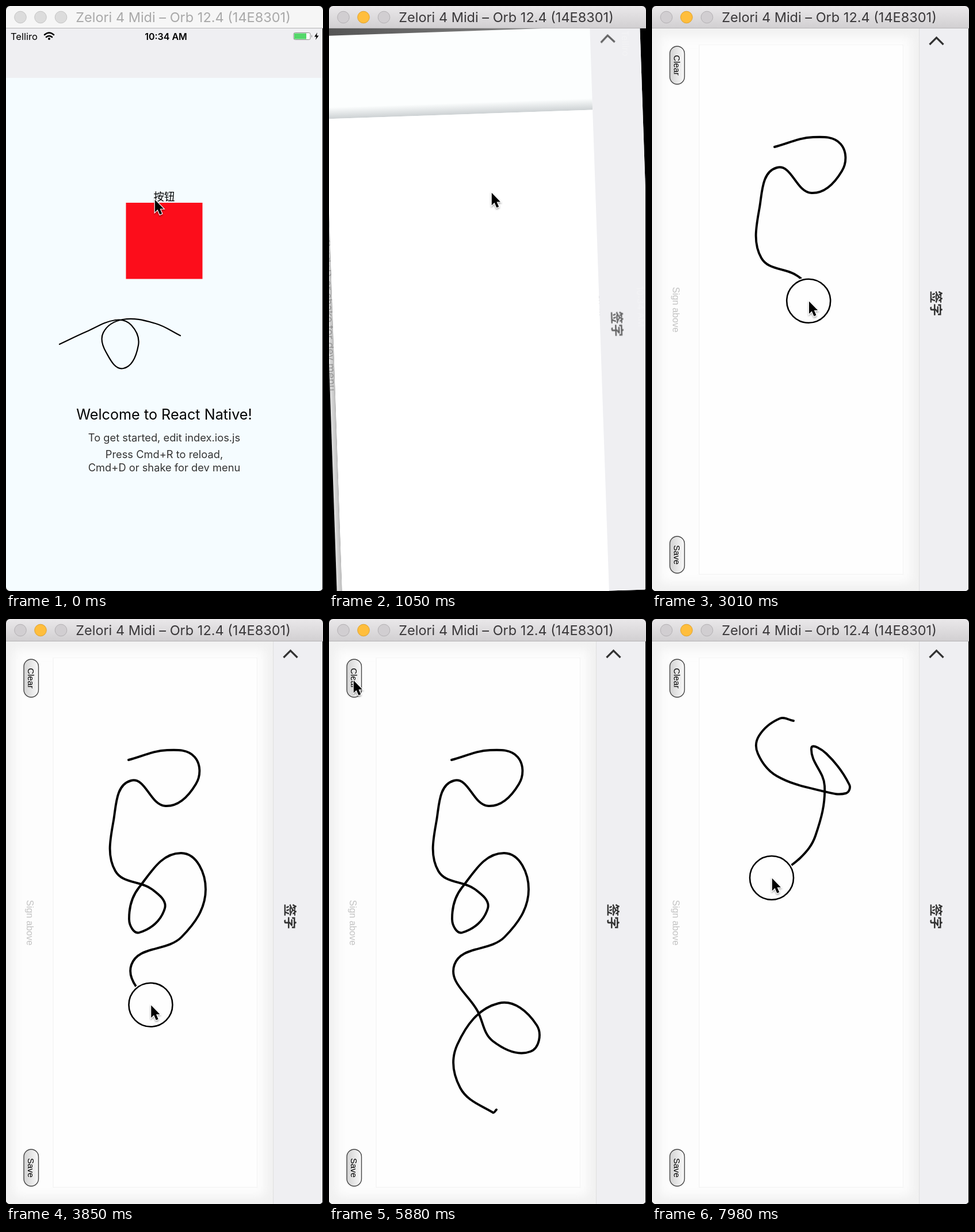
Animation of 551x1017 px, one loop 8000 ms. Source, as an HTML page:

```html
<!DOCTYPE html>
<html lang="en">
<head>
<meta charset="utf-8">
<title>Sign pad</title>
<style>
html, body { margin: 0; width: 100%; height: 100%; overflow: hidden; background: #000; }
svg { display: block; font-family: Inter, "Noto Sans CJK SC", "Noto Sans CJK", sans-serif; }
.mid { text-anchor: middle; }
.web { font-family: "Liberation Sans", Arial, sans-serif; text-anchor: middle; }
.line { fill: none; stroke: #000; stroke-linecap: round; stroke-linejoin: round; }
.bar { fill: #f6f6f6; }
.title { fill: #a9a9a9; font-size: 23.5px; }
.light { fill: #dcdcdc; stroke: #c4c4c4; }
.on .bar { fill: url(#barFill); }
.on .title { fill: #3a383a; }
.on .light { fill: #d1ced1; stroke: #b3b0b3; }
.on .light.min { fill: #ffbe3d; stroke: #dfa12c; }
</style>
</head>
<body>
<svg id="stage" width="551" height="1017" viewBox="0 0 551 1017">
  <defs>
    <linearGradient id="barFill" x2="0" y2="1"><stop stop-color="#eae8ea"/><stop offset="1" stop-color="#d1cfd1"/></linearGradient>
    <linearGradient id="shade" x2="0" y2="1"><stop stop-color="#8a9297" stop-opacity="0"/><stop offset="1" stop-color="#8a9297" stop-opacity=".42"/></linearGradient>
    <linearGradient id="edge"><stop stop-color="#e2e2e2"/><stop offset="1" stop-color="#bdbdbd"/></linearGradient>
    <linearGradient id="btn"><stop stop-color="#d2d2d2"/><stop offset="1" stop-color="#fafafa"/></linearGradient>
    <linearGradient id="gap"><stop stop-color="#555"/><stop offset="1" stop-color="#888"/></linearGradient>
    <filter id="soft"><feGaussianBlur stdDeviation="9"/></filter>
    <filter id="drop" x="-50%" y="-50%" width="200%" height="200%"><feDropShadow dx="0" dy="2" stdDeviation="1.5" flood-opacity=".4"/></filter>
    <clipPath id="win"><rect width="551" height="1017" rx="7"/></clipPath>
    <clipPath id="view"><rect y="39" width="550" height="978"/></clipPath>
    <clipPath id="page"><rect y="39" width="464" height="978"/></clipPath>
  </defs>
  <g clip-path="url(#win)">
    <g clip-path="url(#view)">
      <rect y="39" width="400" height="16" fill="url(#gap)"/>
      <g id="screen">
        <g id="plate">
          <rect y="39" width="551" height="981" fill="#fcfefe"/>
          <rect x="-9" y="39" width="9" height="981" fill="url(#edge)"/>
        </g>
        <g id="home" transform="rotate(90 275 528)">
          <g id="wall">
            <rect y="39" width="551" height="978" fill="#f5fcff"/>
            <rect y="39" width="551" height="86" fill="#efeff2"/>
          </g>
          <g id="content">
            <text x="8" y="59" font-size="16.500">Telliro</text>
            <path class="line" stroke-width="2.600" d="M67 50q8-7 16 0M70 54q5-4 10 0"/>
            <circle cx="75" cy="57" r="2"/>
            <text class="mid" x="278" y="59" font-size="16" font-weight="600">10:34 AM</text>
            <rect x="500" y="46.500" width="29" height="12" rx="2.500" fill="#fff" stroke="#8b8b8b"/>
            <path d="M501 47.500h21v10h-21z" fill="#53d769"/>
            <path d="M531 50q2 2.500 0 5z" fill="#777"/>
            <path d="M541 46l-5 7.500h3.500l-1.500 5.500 5.500-7.500h-3.500z"/>
            <text id="button" class="mid" x="275" y="338" font-size="18.500">按钮</text>
            <rect x="208.500" y="342" width="133" height="132.500" fill="#fc0d1b"/>
            <path id="doodle" class="line" stroke-width="2.200"/>
            <text class="mid" x="275" y="719" font-size="25.200">Welcome to React Native!</text>
            <g class="mid" font-size="18.300" fill="#333">
              <text x="275" y="757">To get started, edit index.ios.js</text>
              <text x="275" y="786">Press Cmd+R to reload,</text>
              <text x="275" y="809">Cmd+D or shake for dev menu</text>
            </g>
          </g>
        </g>
        <g id="frame">
          <g id="card">
            <rect y="19" width="464" height="20" fill="url(#shade)"/>
            <rect y="39" width="464" height="981" fill="#fff"/>
          </g>
          <g id="head">
            <rect x="464" y="39" width="87" height="981" fill="#efeff2"/>
            <g id="ghost" fill="#fff" font-size="16">
              <text transform="translate(519 47) rotate(90)">Telliro</text>
              <text class="mid" transform="translate(530 528) rotate(90)">10:34 AM</text>
            </g>
            <g id="labels">
              <path d="M482.500 67l12-12 12 12" fill="none" stroke="#333" stroke-width="3.200"/>
              <g id="caption"><text class="mid" transform="translate(486 517) rotate(90)" font-size="22" font-weight="600" fill="#333">签字</text></g>
            </g>
          </g>
          <g id="pad">
            <g clip-path="url(#page)">
              <rect y="39" width="464" height="978" fill="#fdfdfd"/>
              <rect y="39" width="464" height="978" fill="none" stroke="#f0f0f0" stroke-width="26" filter="url(#soft)"/>
            </g>
            <path d="M464.500 39v978" stroke="#dededf"/>
            <rect x="82" y="67.500" width="354.500" height="920.500" fill="#fefefe" stroke="#f5f5f5" stroke-width="1.500"/>
            <g fill="url(#btn)" stroke="#444" stroke-width="1.400">
              <rect x="31" y="70" width="25.500" height="66" rx="12.700"/>
              <rect x="31" y="922" width="25.500" height="64" rx="12.700"/>
            </g>
            <g class="web" font-size="14.800">
              <text transform="translate(38 103) rotate(90)">Clear</text>
              <text transform="translate(38 954) rotate(90)">Save</text>
              <text transform="translate(36 528) rotate(90)" font-size="15.800" fill="#c2c2c2">Sign above</text>
            </g>
          </g>
        </g>
      </g>
      <g class="line" stroke-width="3.900"><path id="first"/><path id="second"/></g>
      <g id="ring" fill="none">
        <circle r="38" stroke="#fff" stroke-width="6"/>
        <circle r="38" stroke="#000" stroke-width="2.600"/>
      </g>
    </g>
    <rect class="bar" width="551" height="39"/>
    <path d="M0 38.500h551" stroke="#b5b3b5"/>
    <circle class="light" cx="25" cy="19.500" r="10.300"/>
    <circle class="light min" cx="60" cy="19.500" r="10.300"/>
    <circle class="light" cx="95.500" cy="19.500" r="10.300"/>
    <text class="title mid" x="308" y="28">Zelori 4 Midi – Orb 12.4 (14E8301)</text>
    <g id="cursor">
      <path transform="translate(.8 .8) scale(.92)" d="M0 0V23.500L5.200 18.500L9.300 28L13.500 26.200L9.500 17H16.500Z" stroke="#fff" stroke-width="2.400" paint-order="stroke" filter="url(#drop)"/>
    </g>
  </g>
</svg>
<script>
const LOOP = 8000, STEP = 70;
const CLEARED = 6000, LAG = 42;
const $ = id => document.getElementById(id);
const set = (id, name, value) => $(id).setAttribute(name, value);
const show = (id, on) => { $(id).style.display = on ? '' : 'none'; };
const ramp = (t, a, b) => Math.min(1, Math.max(0, (t - a) / (b - a)));
const smooth = p => p * p * (3 - 2 * p);

// Smooth curve through a few turning points; handles scale with each chord
function curve(text) {
  const pts = text.split(' ').map(p => p.split(',').map(Number));
  const handle = (i, size) => {
    const a = pts[Math.max(0, i - 1)], b = pts[Math.min(pts.length - 1, i + 1)];
    const k = size / Math.hypot(b[0] - a[0], b[1] - a[1]);
    return pts[i].map((v, j) => v + (b[j] - a[j]) * k);
  };
  return 'M' + pts[0] + pts.slice(1).map((p, i) => {
    const size = 0.36 * Math.hypot(p[0] - pts[i][0], p[1] - pts[i][1]);
    return `C${handle(i, size)} ${handle(i + 1, -size)} ${p}`;
  }).join('');
}

set('doodle', 'd', curve('93,588 140,566 190,546 218,555 230,590 204,630 174,602 169,568 203,545 260,552 303,573'));
set('first', 'd', curve('213,245 280,228 328,240 330,287 277,325 217,281 187,350 190,438 254,470 276,503 ' +
  '232,545 214,522 231,467 305,407 347,470 305,553 218,601 259,683 285,734 350,752 361,706 295,668 ' +
  '223,740 228,815 285,858 291,853'));
set('second', 'd', curve('246,177 222,173 186,203 184,234 217,273 300,300 337,303 343,288 303,234 277,225 ' +
  '300,290 284,377 257,416 208,450'));

// Pointer actions in order: glide to a place, or draw a stroke at even speed
const actions = [
  { from: 70, to: 280, x: 282, y: 324 },
  { from: 1450, to: 1950, x: 206, y: 258 },
  { from: 2160, to: 4600, stroke: 'first' },
  { from: 4600, to: 4690, x: 282, y: 797 },
  { from: 4690, to: 5030, x: 42, y: 106 },
  { from: 6200, to: 6900, x: 246, y: 177 },
  { from: 7070, to: 7980, stroke: 'second' },
];
const strokes = actions.filter(a => a.stroke);
for (const s of strokes) s.length = $(s.stroke).getTotalLength();
const clicks = [490, 5900];

function pointer(t) {
  let x = 258, y = 336;
  for (const a of actions.filter(a => t >= a.from)) {
    const p = ramp(t, a.from, a.to);
    if (a.stroke) {
      ({ x, y } = $(a.stroke).getPointAtLength(a.length * p));
    } else {
      x += (a.x - x) * smooth(p);
      y += (a.y - y) * smooth(p);
    }
  }
  return `translate(${x} ${y})`;
}

function draw(t) {
  $('stage').classList.toggle('on', t >= 420);
  set('button', 'opacity', t >= 490 && t < 700 ? 0.3 : 1);

  // Device rotation and page push
  const turn = 1 - smooth(ramp(t, 770, 1077));
  const slide = (1 - ramp(t, 770, 1364)) ** 3;
  const shift = `translate(${275 * turn} ${165 * turn})`;
  set('screen', 'transform', `rotate(${-90 * turn} 275 528)`);
  set('frame', 'transform', shift);
  set('plate', 'transform', shift);
  set('wall', 'opacity', ramp(turn, 0.03, 0.4));
  set('content', 'opacity', 0.35 + 0.65 * turn);
  show('home', slide > 0);
  set('card', 'transform', `translate(0 ${978 * slide})`);
  set('head', 'opacity', ramp(turn, 1, 0.05));
  set('ghost', 'opacity', 2 * slide);
  set('labels', 'opacity', 1 - 1.7 * Math.min(slide, 0.5));
  set('caption', 'transform', `translate(0 ${270 * slide})`);
  show('pad', t >= 1470);

  // Ink trails the pen until the button is released
  for (const s of strokes) {
    const ink = s.length * ramp(t, s.from, s.to) - (t < s.to || s.to > CLEARED ? LAG : 0);
    show(s.stroke, ink > 0 && (t < CLEARED || s.from > CLEARED));
    set(s.stroke, 'stroke-dasharray', `${Math.max(0, ink)} ${s.length + 9}`);
  }

  const spot = pointer(t);
  set('cursor', 'transform', spot);
  set('ring', 'transform', spot);
  show('ring', clicks.some(c => t >= c && t < c + 140) ||
    strokes.some(s => t >= s.from && (t < s.to || s.to > CLEARED)));
}

const start = performance.now();
function tick() {
  const t = (performance.now() - start) % LOOP;
  draw(Math.floor(t / STEP) * STEP);
  requestAnimationFrame(tick);
}
tick();
</script>
</body>
</html>
```
